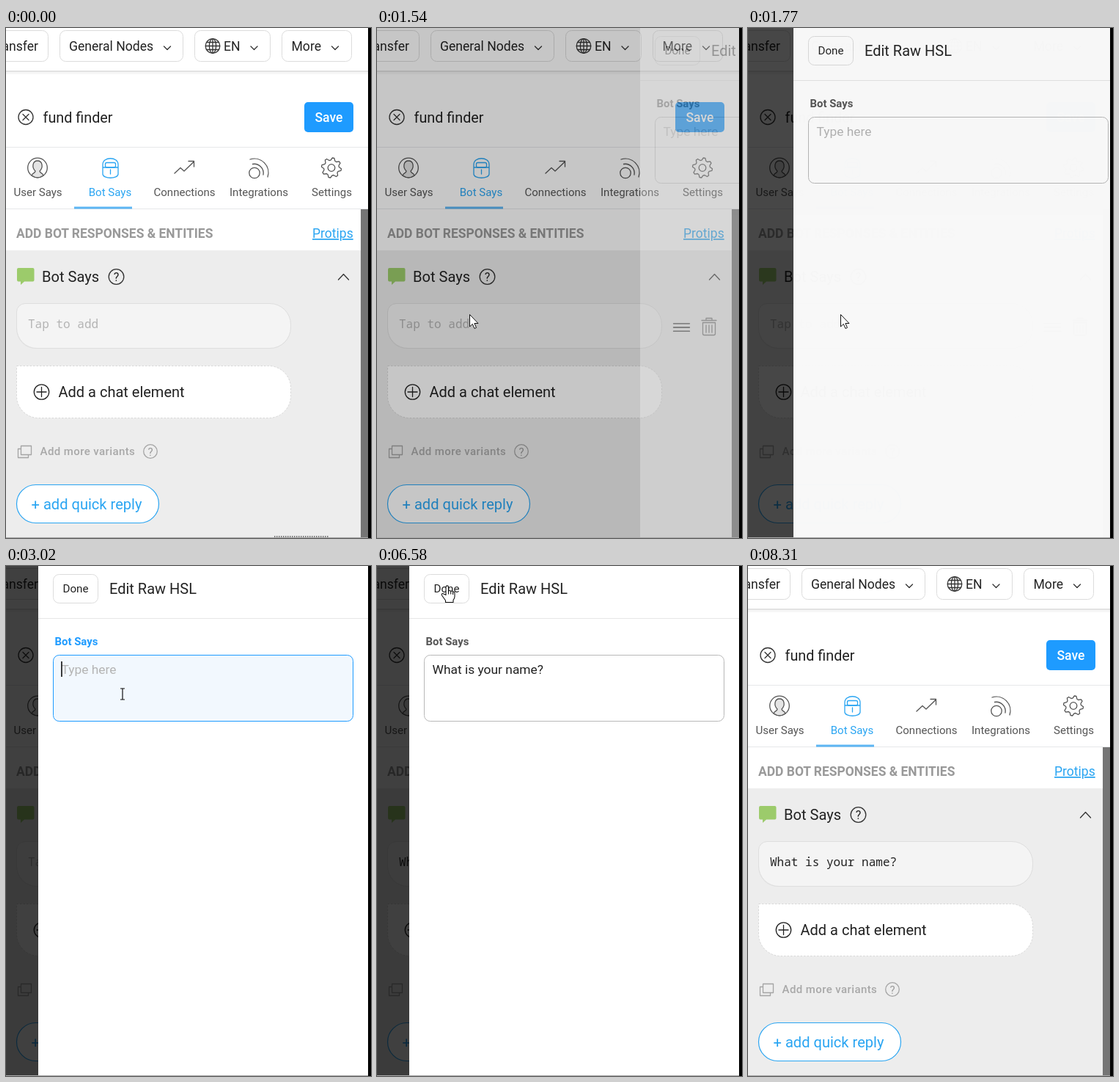
Recreate the animation shown at these times as an HTML page. Size 498 px wide and 695 px high, loop 8.94 s.

```html
<!DOCTYPE html>
<html lang="en">
<head>
<meta charset="utf-8">
<title>Bot editor</title>
<style>
html, body { margin: 0; width: 100%; height: 100%; overflow: hidden; background: #fff; }
svg { display: block; width: 498px; height: 695px; }
text { font-family: Roboto, sans-serif; fill: #222; white-space: pre; }
.mono { font-family: "Noto Sans Mono", monospace; font-size: 16.05px; }
.bar { font-size: 17.6px; }
.tab { font-size: 15.05px; fill: #555; text-anchor: middle; }
.big { font-size: 20px; }
.line { fill: none; stroke: #333; stroke-width: 1.3; stroke-linecap: round; stroke-linejoin: round; }
.box { fill: #fff; stroke: #dcdcdc; }
.blue { stroke: #2aa5f2; }
.soft { stroke: #a5a5a5; }
.hint { fill: #b4b4b4; }
</style>
</head>
<body>
<svg viewBox="0 0 498 695">
  <rect width="498" height="695" fill="#fff"/>

  <!-- top bar -->
  <rect y="58" width="494" height="2" fill="#e2e2e2"/>
  <rect y="60" width="494" height="3" fill="#f6f6f6"/>
  <g class="box">
    <rect x="-40.5" y="3.5" width="98" height="42" rx="8"/>
    <rect x="73.5" y="3.5" width="168" height="42" rx="8"/>
    <rect x="257.5" y="3.5" width="103" height="42" rx="8"/>
    <rect x="376.5" y="3.5" width="95" height="42" rx="8"/>
  </g>
  <text class="bar" x="44" y="31" text-anchor="end">Transfer</text>
  <text class="bar" x="86" y="31">General Nodes</text>
  <text class="bar" x="297" y="31">EN</text>
  <text class="bar" x="389.5" y="31">More</text>
  <g class="line" stroke-width="1.1">
    <path d="M215.500 25l4.500 4.500 4.500-4.500M334 25l4.500 4.500 4.500-4.500M444.500 25l4.500 4.500 4.500-4.500"/>
    <circle cx="282" cy="24.500" r="9.800"/>
    <ellipse cx="282" cy="24.500" rx="4.600" ry="9.800"/>
    <path d="M282 15v19M272.500 24.500h19M274 19.500h16M274 29.500h16"/>
  </g>

  <!-- title row -->
  <g class="line" stroke-width="1.1">
    <circle cx="27" cy="121.500" r="10"/>
    <path d="M23 117.500l8 8M31 117.500l-8 8"/>
  </g>
  <text x="50.5" y="129" font-size="19.8">fund finder</text>
  <rect x="407" y="101" width="67" height="41" rx="5" fill="#1e9bff"/>
  <text x="440.500" y="128" font-size="17.6" font-weight="500" text-anchor="middle" style="fill:#fff">Save</text>

  <!-- tabs -->
  <path d="M0 162.500H494M0 246.500H494" stroke="#e6e8ea"/>
  <rect x="93" y="243.500" width="79" height="3" fill="#5db5f3"/>
  <g class="line" style="stroke:#555">
    <circle cx="43" cy="190.500" r="13.300"/>
    <path fill="#e4e4e4" d="M35 201c1-4 5-3 5-6-5-5-4-14 3-14s8 9 3 14c0 3 4 2 5 6-5 3.500-11 3.500-16 0z"/>
    <path d="M230 198l8-7.500 5 4.500 13-12.500M249 181.500h7.500v7.500"/>
    <circle cx="339" cy="197.500" r="7.200"/>
    <path d="M336.500 185.500a12.500 12.500 0 0 1 14.500 14.500M333 179a19 19 0 0 1 24 24"/>
    <circle cx="444" cy="190.500" r="4.800"/>
    <path id="gear"/>
  </g>
  <g class="line blue">
    <path d="M132 186c0-11 21-11 21 0v13c0 7-21 7-21 0zM132 190h21M142.500 193v6" />
    <rect x="135.500" y="183.500" width="14" height="6.500" rx="2"/>
  </g>
  <text class="tab" x="43.500" y="229">User Says</text>
  <text class="tab" x="142" y="229" style="fill:#2aa5f2">Bot Says</text>
  <text class="tab" x="243.500" y="229">Connections</text>
  <text class="tab" x="345" y="229">Integrations</text>
  <text class="tab" x="444.500" y="229">Settings</text>

  <!-- section -->
  <text x="14" y="286" font-size="17.45" font-weight="700" style="fill:#999">ADD BOT RESPONSES &amp; ENTITIES</text>
  <text x="418" y="286" font-size="17.55" text-decoration="underline" style="fill:#2aa5f2">Protips</text>
  <rect y="303" width="484" height="392" fill="#ededed"/>
  <rect x="484" y="247" width="10" height="448" fill="#757575"/>
  <path fill="#9ccb6b" d="M17 327H36.500q2 0 2 2V343.500q0 2-2 2H25L20 350V345.500H17q-2 0-2-2V329q0-2 2-2z"/>
  <text x="49" y="346" font-size="20.1">Bot Says</text>
  <circle class="line" cx="150.500" cy="339" r="10.300"/>
  <text x="150.500" y="345" font-size="16" text-anchor="middle">?</text>
  <path class="line" d="M453.500 343l7-7.500 7 7.500"/>

  <g id="field">
    <path d="M26 376.500H360a28 28 0 0 1 28 28v5a28 28 0 0 1-28 28H40a26 26 0 0 1-26-26V388a12 12 0 0 1 12-12z" transform="translate(.5 -.5)" fill="#e4e4e4"/>
    <path d="M26 375.500H360a28.500 28.500 0 0 1 28.500 28.500v4a28.500 28.500 0 0 1-28.500 28.500H42a27.500 27.500 0 0 1-27.500-27.500V387a11.500 11.500 0 0 1 11.500-11.500z" fill="#f4f4f4" stroke="#dedede"/>
    <text id="echo" class="mono" x="30" y="409"></text>
  </g>
  <g id="tools" class="line">
    <path d="M404.500 402.800h22M404.500 408h22M404.500 413.200h22"/>
    <path style="stroke:#808080" d="M443 398.500h20M449 398v-2.500h8v2.500M444.500 401.500h17v15q0 2-2 2h-13q-2 0-2-2zM449 405v10M453 405v10M457 405v10"/>
  </g>

  <path d="M14.500 460.500H358a30 30 0 0 1 30.500 30v11a30 30 0 0 1-30.500 30H44a30 30 0 0 1-29.500-30z" fill="#fff" stroke="#d8d8d8" stroke-dasharray="2.500 2"/>
  <g class="line" style="stroke:#222">
    <circle cx="48.500" cy="496" r="10.200"/>
    <path d="M48.500 489.500v13M42 496h13"/>
  </g>
  <text class="big" x="71.500" y="503">Add a chat element</text>

  <path class="line soft" d="M20.500 569.500h14v12h-14zM20 573.500h-3.500v12h14v-3.500"/>
  <text x="46.500" y="582" font-size="15" font-weight="500" letter-spacing=".4" style="fill:#a8a8a8">Add more variants</text>
  <circle class="line soft" cx="197" cy="577" r="9.300"/>
  <text x="197" y="582.500" font-size="15" text-anchor="middle" style="fill:#999">?</text>

  <rect class="blue" x="14.500" y="622.500" width="194" height="52" rx="26" fill="#fff" stroke-width="1.200"/>
  <text x="34.500" y="656" font-size="20.1" style="fill:#2aa5f2">+ add quick reply</text>
  <path id="dots" d="M366 693H441" stroke="#555" stroke-width="1.500" stroke-dasharray="1.500 1.500"/>

  <rect id="shade" width="494" height="695"/>

  <!-- side panel -->
  <g id="panel">
    <rect width="460" height="695" fill="#fff"/>
    <path d="M0 71.500H450" stroke="#e6e6e6"/>
    <rect class="box" x="20.500" y="11.500" width="61" height="39" rx="8"/>
    <text x="51" y="36" font-size="15.2" text-anchor="middle">Done</text>
    <text class="big" x="97" y="38">Edit Raw HSL</text>
    <text id="label" x="22.500" y="108" font-size="14.9" font-weight="700">Bot Says</text>
    <rect id="area" x="20.500" y="121.500" width="409" height="90" rx="8"/>
    <text id="entry" x="31.500" y="147" font-size="17.4"></text>
    <rect id="caret" y="130" width="1.500" height="21"/>
  </g>

  <rect y="694" width="494" height="1" fill="#a8a8a8"/>
  <rect x="494" width="4" height="695"/>

  <!-- pointers -->
  <path id="arrow" d="M.5 .5V17L4.300 13.400 7 19.500 9.500 18.400 6.900 12.500H12z" fill="#fff" stroke="#111"/>
  <path id="beam" d="M-3-7.500h2.500l.5.500.500-.5H3M0-7V7M-3 7.500h2.500L0 7l.5.500H3" fill="none" stroke="#111" stroke-width="1.200"/>
  <path id="hand" d="M-2 13V2q0-1.600 1.700-1.600T1.500 2V8.500q0-1.500 1.600-1.500T4.700 8.700q0-1.300 1.500-1.200T7.600 9.400q0-1.100 1.200-.9T10 10.500V15q0 3-2 5V23H-2.500V20.500Q-5 17-7.500 13.500C-8.600 11.500-6.500 10.300-5 11.500zM1.500 8.500V12M4.700 9V12M7.600 9.500V12.500" fill="#fff" stroke="#111" stroke-width="1.100" stroke-linejoin="round"/>
</svg>
<script>
const LOOP = 8940;
const MESSAGE = "What is your name?";
const $ = id => document.getElementById(id);

// Each row: time, value(s). The last row already reached applies.
const slide = [[0, 0], [1540, .3], [1610, .773], [1700, .96], [1780, 1],
  [6820, .72], [6900, .14], [6980, 0]];
const typed = [[0, 0], [3160, 1], [3330, 2], [3390, 3], [3540, 4], [3860, 6], [3940, 7],
  [4410, 9], [4560, 10], [4630, 11], [4710, 12], [4790, 13], [4960, 15], [5190, 17], [5590, 18]];
const caretOn = [[0, 0], [1960, 1], [2470, 0], [3020, 1], [6120, 0]];
const fieldIn = [[0, 1], [6900, 0], [7060, .4], [7130, .8], [7210, 1]];
const pointer = [[0, 0, 0, ""],
  [90, 360, 653, "arrow"], [150, 330, 585, "arrow"], [210, 303, 520, "arrow"],
  [450, 285, 490, "arrow"], [520, 255, 456, "arrow"], [600, 222, 425, "arrow"], [670, 196, 412, "arrow"],
  [830, 165, 403, "arrow"], [910, 138, 395, "arrow"], [990, 121, 391, "arrow"], [1310, 126, 390, "arrow"],
  [1860, 132, 372, "arrow"], [1960, 150, 320, "arrow"], [2040, 172, 260, "arrow"], [2110, 190, 222, "arrow"],
  [2180, 200, 205, "beam"], [2250, 205, 192, "beam"], [2320, 207, 187, "beam"],
  [2470, 180, 180, "beam"], [2620, 159, 174.5, "beam"],
  [6190, 156, 160, "beam"], [6270, 145, 131, "beam"], [6350, 125, 90, "arrow"], [6420, 108, 56, "arrow"],
  [6500, 99, 36, "hand"], [6580, 96, 26.5, "hand"]];

// The pointer leaves through the bottom edge.
for (let i = 1; i < 11; i++) {
  const k = i / 10, y = 27 + 655 * k ** 1.2;
  pointer.push([7450 + (i - 1) * 78, 96 + 240 * k, y, y < 46 ? "hand" : "arrow"]);
}
pointer.push([8230, 0, 0, ""]);

const at = (rows, t) => rows.findLast(row => row[0] <= t);
const set = (id, attrs) => {
  for (const key in attrs) $(id).setAttribute(key, attrs[key]);
};
const show = (id, on) => set(id, { visibility: on ? "visible" : "hidden" });

function gearPath() {
  let d = "";
  for (let i = 0; i < 32; i++) {
    const a = (i + .5) / 32 * 2 * Math.PI, r = i % 4 < 2 ? 13.6 : 10.4;
    d += `${i ? "L" : "M"}${(444 + r * Math.sin(a)).toFixed(1)} ${(190.5 - r * Math.cos(a)).toFixed(1)}`;
  }
  return d + "z";
}

function setText(count) {
  const text = MESSAGE.slice(0, count);
  $("entry").textContent = text || "Type here";
  $("echo").textContent = text || "Tap to add";
  for (const id of ["entry", "echo"]) $(id).classList.toggle("hint", !count);
  set("caret", { x: 31.2 + (count ? $("entry").getComputedTextLength() - .5 : 0) });
}

let shown = -1;
function render(t) {
  const p = at(slide, t)[1];
  set("panel", { transform: `translate(${44 + 450 * (1 - p)})`, opacity: p });
  set("shade", { opacity: .75 * p });

  const count = at(typed, t)[1];
  if (count !== shown) setText(shown = count);

  const focus = t >= 1960 && t < 6580;
  $("label").style.fill = focus ? "#1e9bff" : "#555";
  set("area", { fill: focus ? "#f2f8fe" : "#fff", stroke: focus ? "#1e9bff" : "#b8b8b8" });
  show("caret", at(caretOn, t)[1]);
  set("field", { opacity: at(fieldIn, t)[1] });
  show("dots", t < 1310);

  const [, x, y, kind] = at(pointer, t);
  for (const id of ["arrow", "beam", "hand"]) show(id, id === kind);
  if (kind) set(kind, { transform: `translate(${x} ${y})` });
  show("tools", kind === "arrow" && y > 370 && y < 440);
}

set("gear", { d: gearPath() });
const start = performance.now();
function tick() {
  render((performance.now() - start) % LOOP);
  requestAnimationFrame(tick);
}
tick();
</script>
</body>
</html>
```
